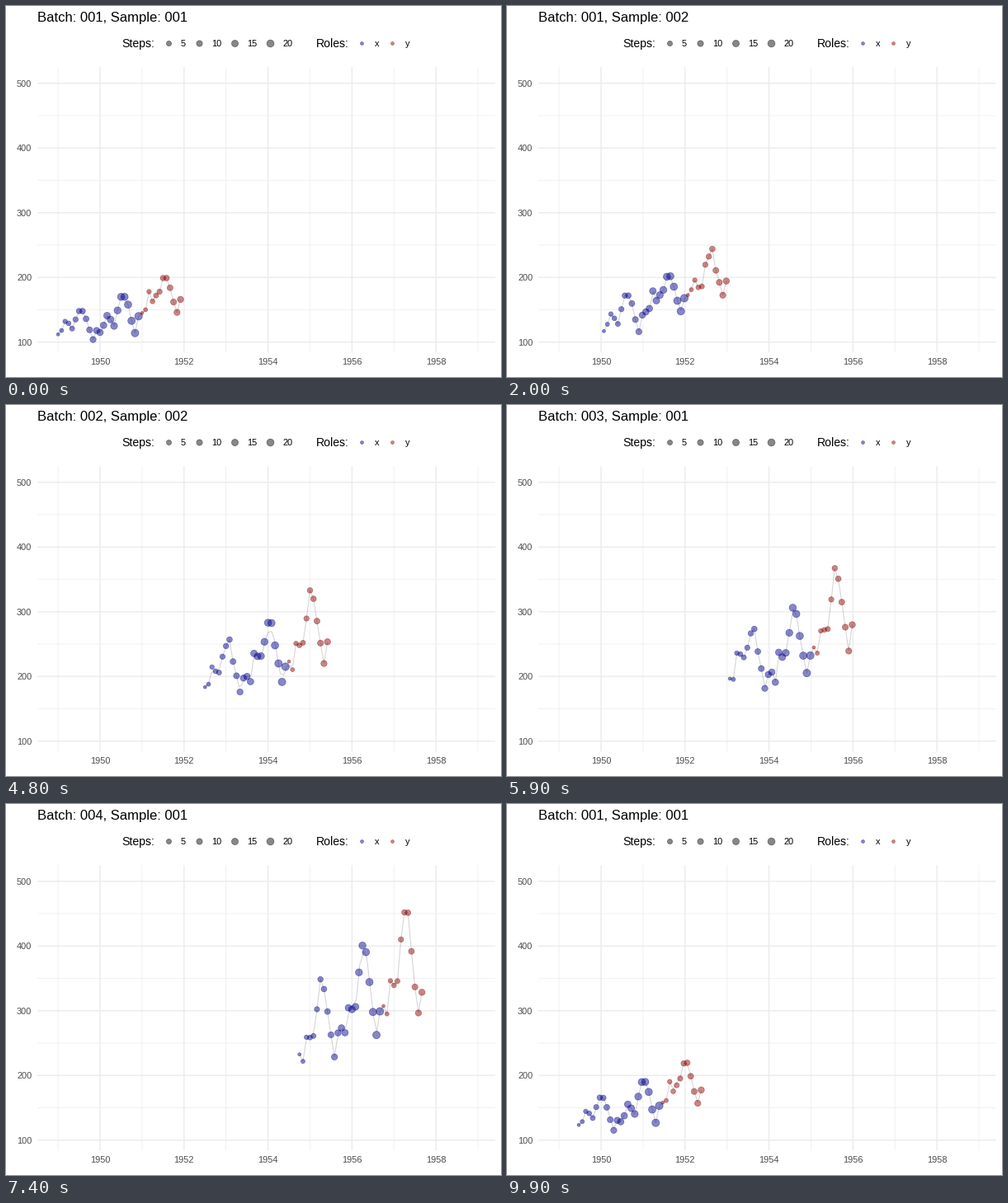
Write a matplotlib script that moves like this. It is 600 by 450 pixels and loops after 10000 ms.

```python
import numpy as np
import matplotlib.pyplot as plt
from matplotlib.animation import FuncAnimation

W, H, DPI = 600, 450, 72          # at 72 dpi one point is one pixel
LEFT, RIGHT, TOP, BOTTOM = 37.9, 593.0, 74.1, 420.3
N_FRAMES, INTERVAL = 100, 100
STARTS = [7, 20, 33, 46, 59, 71, 83, 95]   # first moving frame of each transition
STEPS = 6
N_STATES, WINDOW, N_X = 8, 36, 24
PATH_POINTS = 50
ALPHA = 0.47
BLUE, RED, BLACK = (0, 0, 0.545), (0.545, 0, 0), (0, 0, 0)

VALUES = np.array([
    112, 118, 132, 129, 121, 135, 148, 148, 136, 119, 104, 118,
    115, 126, 141, 135, 125, 149, 170, 170, 158, 133, 114, 140,
    145, 150, 178, 163, 172, 178, 199, 199, 184, 162, 146, 166,
    171, 180, 193, 181, 183, 218, 230, 242, 209, 191, 172, 194,
    196, 196, 236, 235, 229, 243, 264, 272, 237, 211, 180, 201,
    204, 188, 235, 227, 234, 264, 302, 293, 259, 229, 203, 229,
    242, 233, 267, 269, 270, 315, 364, 347, 312, 274, 237, 278,
    284, 277, 317, 313, 318, 374, 413, 405, 355, 306, 271, 306,
    315, 301, 356, 348, 355, 422, 465, 467, 404, 347, 305, 336,
    340, 318, 362, 348, 363, 435, 491, 505, 404, 359, 310, 337], float)
YEARS = 1949 + np.arange(len(VALUES)) / 12


def scale(data, start, end):
    """Linear scale from data range, padded by 5 %, to pixels."""
    lo, hi = data.min(), data.max()
    pad = 0.05 * (hi - lo)
    return lambda v: start + (v - lo + pad) / (hi - lo + 2 * pad) * (end - start)


to_x = scale(YEARS, LEFT, RIGHT)
to_y = scale(VALUES, BOTTOM, TOP)


def to_pixels(points):
    return np.column_stack([to_x(points[:, 0]), to_y(points[:, 1])])


def densify(points, n):
    """Split the longest pieces of a path until it has n points."""
    lengths = np.hypot(*np.diff(points, axis=0).T)
    parts = np.ones(len(lengths), int)
    for _ in range(n - len(points)):
        parts[np.argmax(lengths / parts)] += 1
    pieces = [a + (b - a) * np.arange(k)[:, None] / k
              for a, b, k in zip(points[:-1], points[1:], parts)]
    return np.vstack(pieces + [points[-1:]])


def point_size(step):
    return 1.5 + 2.5 * np.sqrt((np.asarray(step, float) - 1) / 23)


def marker_area(size):
    diameter = 0.75 * (size * 72.27 / 25.4 + 0.945)
    return diameter ** 2


def dots(xy, sizes, colors):
    rgba = [(*c, ALPHA) for c in colors]
    return ax.scatter(*np.transpose(xy), s=marker_area(np.asarray(sizes)),
                      facecolors=rgba, edgecolors=rgba, linewidths=0.71, zorder=4)


def text(x, y, s, size, color="black", ha="left"):
    return ax.text(x, y, s, fontsize=size, color=color, ha=ha, va="baseline")


def grid(xs, ys, width):
    style = dict(color="#EBEBEB", lw=width, snap=False, zorder=1,
                 solid_capstyle="butt")
    for x in xs:
        ax.plot([to_x(x)] * 2, [TOP, BOTTOM], **style)
    for y in ys:
        ax.plot([LEFT, RIGHT], [to_y(y)] * 2, **style)


plt.rcParams["font.family"] = "Liberation Sans"
fig = plt.figure(figsize=(W / DPI, H / DPI), dpi=DPI, facecolor="white")
ax = fig.add_axes([0, 0, 1, 1])
ax.set(xlim=(0, W), ylim=(H, 0))
ax.set_autoscale_on(False)
ax.axis("off")

# Grid and axis labels
grid(range(1949, 1960, 2), range(150, 500, 100), 0.68)
grid(range(1950, 1960, 2), range(100, 600, 100), 1.36)
for year in range(1950, 1960, 2):
    text(to_x(year), 435.4, str(year), 11, "#4D4D4D", "center")
for value in range(100, 600, 100):
    text(31.4, to_y(value) + 4, str(value), 11, "#4D4D4D", "right")

# Legends
LEGEND_Y = 44.6
text(140.6, 50, "Steps:", 14)
for x, step in zip([196.6, 233.8, 277.0, 320.3], [5, 10, 15, 20]):
    dots([(x, LEGEND_Y)], [point_size(step)], [BLACK])
    text(x + 15.2, 48.8, str(step), 11)
text(375.6, 50, "Roles:", 14)
for x, role, color in [(431.3, "x", BLUE), (468.3, "y", RED)]:
    dots([(x, LEGEND_Y)], [1.5], [color])
    text(x + 15.2, 48.8, role, 11)

# Each state is a three year window, one year after the one before
series = np.column_stack([YEARS, VALUES])
windows = [series[12 * i:12 * i + WINDOW] for i in range(N_STATES)]
states = [to_pixels(w) for w in windows]
paths = [to_pixels(densify(w, PATH_POINTS)) for w in windows]
titles = [f"Batch: {i // 2 + 1:03d}, Sample: {i % 2 + 1:03d}" for i in range(N_STATES)]

steps = np.r_[1:N_X + 1, 1:WINDOW - N_X + 1]
colors = [BLUE] * N_X + [RED] * (WINDOW - N_X)
title = text(37.9, 19, titles[0], 16.6)
line, = ax.plot([], [], color="black", alpha=0.18, lw=1.0, zorder=3,
                solid_capstyle="butt")
points = dots(states[0], point_size(steps), colors)


def pose(frame):
    """Return the current state, the next one and the eased progress."""
    current, progress = 0, 0.0
    for i, start in enumerate(STARTS):
        if frame >= start:
            current = i
            progress = min((frame - start + 1) / STEPS, 1)
    return current, (current + 1) % N_STATES, (1 - np.cos(np.pi * progress)) / 2


def draw(frame):
    a, b, e = pose(frame)
    points.set_offsets(states[a] * (1 - e) + states[b] * e)
    line.set_data(*(paths[a] * (1 - e) + paths[b] * e).T)
    title.set_text(titles[b if e > 0.5 + 1e-9 else a])
    return points, line, title


anim = FuncAnimation(fig, draw, frames=N_FRAMES, interval=INTERVAL,
                     init_func=lambda: draw(0), repeat=True, repeat_delay=0)
plt.show()
```
